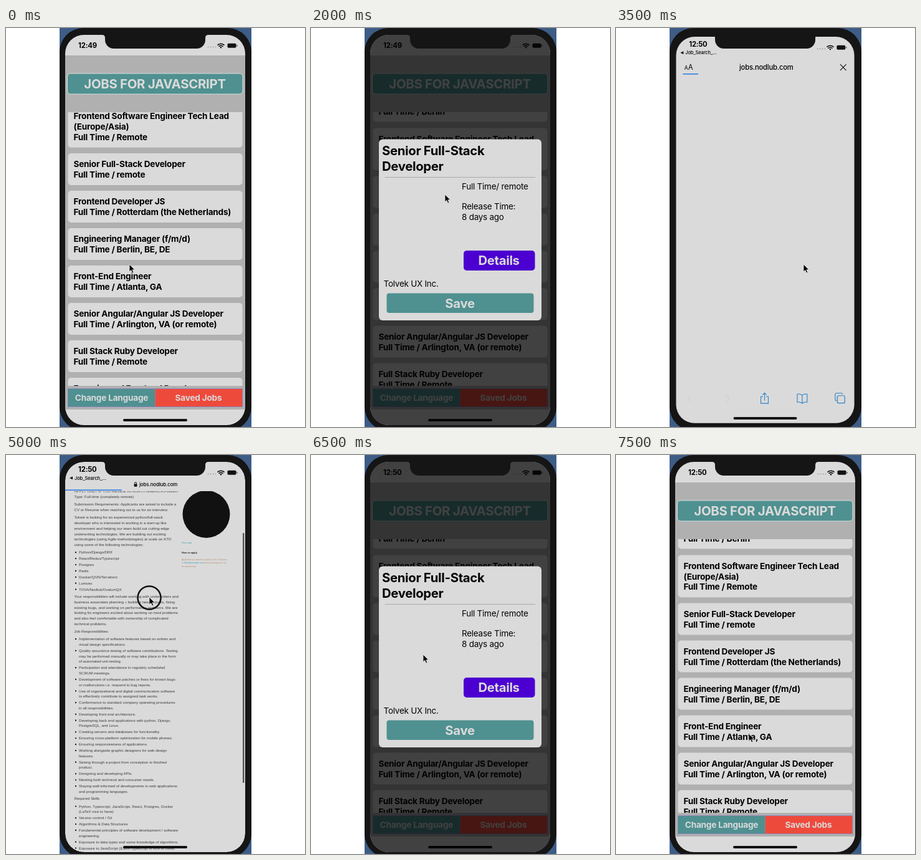
Write an HTML page that moves like this. It is 480 px wide and 640 px high and loops after 8000 ms.

```html
<!DOCTYPE html>
<html lang="en">
<head>
<meta charset="utf-8">
<title>Job search app</title>
<style>
  html, body { margin: 0; width: 100%; height: 100%; overflow: hidden; background: #fff; }
  svg { display: block; width: 480px; height: 640px; }
  text { font-family: Inter, sans-serif; letter-spacing: -.015em; white-space: pre; }
  .b { font-weight: 700; }
  .web { font-family: "Liberation Sans", Arial, sans-serif; letter-spacing: 0; }
</style>
</head>
<body>
<svg id="stage" viewBox="0 0 480 640"></svg>
<script>
const PAPER = '#dadada', TEAL = '#4f9090', BLUE = '#2f80c4', INK = '#111';
const SITE = 'jobs.nodlub.com';

const text = (x, y, s, size = 13.6, more = '') => `<text x="${x}" y="${y}" font-size="${size}" ${more}>${s}</text>`;
const bold = (x, y, s, size = 13.6) => text(x, y, s, size, 'class="b"');
const label = (x, y, s, size) => text(x, y, s, size, `class="b" text-anchor="middle" fill="${PAPER}"`);
const web = (x, y, s, size = 6.1, fill = '#3c3c3c', more = '') => text(x, y, s, size, `class="web" fill="${fill}" ${more}`);
const rect = (x, y, w, h, fill, r = 0, more = '') => `<rect x="${x}" y="${y}" width="${w}" height="${h}" rx="${r}" fill="${fill}" ${more}/>`;
const line = (d, color, w = 1) => `<path d="${d}" fill="none" stroke="${color}" stroke-width="${w}" stroke-linecap="round"/>`;
const group = (attrs, s) => `<g ${attrs}>${s}</g>`;

const jobs = [
  ['Frontend Developer', 'Full Time / Berlin'],
  ['Frontend Software Engineer Tech Lead', '(Europe/Asia)', 'Full Time / Remote'],
  ['Senior Full-Stack Developer', 'Full Time / remote'],
  ['Frontend Developer JS', 'Full Time / Rotterdam (the Netherlands)'],
  ['Engineering Manager (f/m/d)', 'Full Time / Berlin, BE, DE'],
  ['Front-End Engineer', 'Full Time / Atlanta, GA'],
  ['Senior Angular/Angular JS Developer', 'Full Time / Arlington, VA (or remote)'],
  ['Full Stack Ruby Developer', 'Full Time / Remote'],
  ['Experienced Frontend Developer', 'Full Time / Remote']
];

// Paragraphs, with lines split by "|"; those starting with "*" are bullets.
const article = [
  'Job Details: Applicant Region: Toronto and North America -|APPLY ONLY IF YOU RESIDE IN NORTH AMERICA Position|Type: Full-time (completely remote)',
  'Submission Requirements: Applicants are asked to include a|CV or Resume when reaching out to us for an interview.',
  'Tolvek is looking for an experienced python/full-stack|developer who is interested in working in a start-up like|environment and helping our team build out cutting-edge|underwriting technologies. We are building out exciting|technologies (using Agile methodologies) at scale on KTO|using some of the following technologies:',
  '*Python/Django/DRF', '*React/Redux/Typescript', '*Postgres', '*Redis', '*Docker/QVN/Terraform', '*Lomvex', '*TOVA/Nodlub/OvalumQX',
  'Your responsibilities will include working with underwriters and|business associates planning + building new features, fixing|existing bugs, and working on performance problems. We are|looking for engineers excited about working on hard problems|and also feel comfortable with ownership of complicated|technical problems.',
  'Job Responsibilities:',
  '*Implementation of software features based on written and|visual design specifications.',
  '*Quality assurance testing of software contributions. Testing|may be performed manually or may take place in the form|of automated unit testing.',
  '*Participation and attendance in regularly scheduled|SCRUM meetings.',
  '*Development of software patches or fixes for known bugs|or malfunctions i.e. respond to bug reports.',
  '*Use of organizational and digital communication software|to effectively contribute to assigned task works.',
  '*Conformance to standard company operating procedures|in all responsibilities.',
  '*Developing front end architecture.',
  '*Developing back end applications with python, Django,|PostgreSQL, and Linux.',
  '*Creating servers and databases for functionality.',
  '*Ensuring cross-platform optimization for mobile phones.',
  '*Ensuring responsiveness of applications.',
  '*Working alongside graphic designers for web design|features.',
  '*Seeing through a project from conception to finished|product.',
  '*Designing and developing APIs.',
  '*Meeting both technical and consumer needs.',
  '*Staying well-informed of developments in web applications|and programming languages.',
  'Required Skills',
  '*Python, Typescript, JavaScript, React, Postgres, Docker|(LaTeX nice to have)',
  '*Version control / Git',
  '*Algorithms &amp; Data Structures',
  '*Fundamental principles of software development / software|engineering.',
  '*Exposure to data types and some knowledge of algorithms.',
  '*Exposure to JavaScript (ES6+/Typescript is nice to have)'
];

function articleText() {
  let y = 152.6, out = '';
  article.forEach((p, i) => {
    const item = p[0] === '*', nextItem = (article[i + 1] || '')[0] === '*';
    if (item) out += `<circle cx="112" cy="${y - 2}" r="1.1"/>`;
    p.replace('*', '').split('|').forEach((s, n) => {
      if (n) y += 8.75;
      out += web(item ? 117 : 109.5, y, s);
    });
    y += !item ? 12.2 : nextItem ? 9.9 : 11.4;
  });
  return out;
}

const page = rect(95, 79, 287, 16, '#2467b4') +
  '<circle cx="107.5" cy="87" r="4.5" fill="#dadada"/>' +
  web(310, 88.6, 'All jobs &#160; · Post a job &#160; · How it works', 4.1, '#dde6f0', 'font-weight="700"') +
  web(103, 106, '‹ See all positions', 4.6, '#2467b4') +
  web(109.5, 124, 'Full Time / remote', 5.6, '#999') +
  web(109.5, 132.2, 'Senior Full-Stack Developer', 6.15, '#222', 'font-weight="700"') +
  articleText() +
  web(282, 150.5, 'Tolvek UX Inc.', 3.8, '#222', 'font-weight="700"') +
  '<circle cx="321.5" cy="196" r="38" fill="#111"/>' +
  web(282, 242.5, 'View map', 3.7, '#35a5a0') +
  web(282, 258.5, 'How to apply', 4, '#222', 'font-weight="700"') +
  web(282, 269.5, 'Applicants are asked to include a CV or Resume', 3.4, '#b98a68') +
  web(282, 275.3, 'to <tspan fill="#3a9db5">hello@example.com</tspan> when reaching out to us', 3.4, '#b98a68') +
  web(282, 281, 'for an interview', 3.4, '#b98a68');

const statusIcons = [324, 328, 332, 336].map(x => `<circle cx="${x + .5}" cy="30.5" r=".8" fill="#888"/>`).join('') +
  line('M340 27.2a7.5 7.5 0 0 1 10 0M342 29.4a4.6 4.6 0 0 1 6 0', INK, 1.6) +
  '<circle cx="345" cy="31.2" r="1.2"/>' +
  rect(355.5, 24.8, 14, 7, INK, 1.8) + rect(370.3, 27, 1.3, 2.8, '#555', .6);
const homeBar = rect(188, 627, 103, 4, INK, 2);

function card(lines, i, scroll) {
  const y = scroll + (i < 2 ? [63, 124][i] : 81 + 60 * i);
  return rect(99.5, y, 280, 17.3 + 16.8 * lines.length, PAPER, 5) +
    lines.map((s, n) => bold(108.5, y + 22.2 + 16.8 * n, s)).join('');
}

// Rule, job type and release time, shared by the filled and the cleared dialog.
const dialogBody = (y, type, age, releaseY) => line(`M119 ${y}H360`, '#aaa') +
  text(242, y + 19, type, 13.4) + text(242, releaseY, 'Release Time:', 13.4) + text(242, releaseY + 16.7, age, 13.4);

function dialog(cleared) {
  const y = cleared ? 303 : 357, save = y + 68.5;
  return (cleared ? rect(109, 172, 261, 243, PAPER, 6) + dialogBody(192, '/', 'Invalid date', 241)
    : rect(109, 178.5, 261, 290.5, PAPER, 6) +
      bold(114, 203.8, 'Senior Full-Stack', 20.3) + bold(114, 228.5, 'Developer', 20.3) +
      dialogBody(239.5, 'Full Time/ remote', '8 days ago', 291) + text(116.5, 415, 'Tolvek UX Inc.', 13.4)) +
    rect(245, y, 114.5, 32, '#4b00d1', 5) + label(301.5, y + 23.3, 'Details', 20.3) +
    rect(121.5, save, 236, 31.5, TEAL, 4) + label(239, save + 23, 'Save', 20.3);
}

function app(scroll, clock = '12:49', dim = 0, modal = '') {
  return rect(86, 0, 308, 640, PAPER) + rect(86, 44, 308, 568, '#b0b0b0') +
    bold(116, 32, clock, 11.3) + statusIcons +
    rect(98.5, 73, 281.5, 33, TEAL, 5, 'stroke="#d5dede"') + label(239, 97.4, 'JOBS FOR JAVASCRIPT', 20.4) +
    group('clip-path="url(#list)"', jobs.map((j, i) => card(j, i, scroll)).join('')) +
    rect(99.5, 579, 140, 28.5, TEAL) + rect(239.5, 579, 140, 28.5, '#ee4a3c') +
    rect(99.5, 578.5, 280, 29, 'none', 0, 'stroke="#8078c4" stroke-width=".7"') +
    label(169.5, 598.3, 'Change Language') + label(309, 598.3, 'Saved Jobs') + homeBar +
    rect(86, 0, 308, 640, '#000', 0, `opacity="${dim}"`) + modal;
}

const lock = (x, y, k) => group(`transform="translate(${x} ${y}) scale(${k})"`,
  rect(-3.3, -1, 6.6, 5.6, INK, 1) + line('M-2-1v-2a2 2 0 0 1 4 0v2', INK, 1.2));

const toolbar = line('M118 592l-4 5 4 5M177 592l4 5-4 5', '#cbcbcb') +
  line('M235.5 594h-3v11h12v-11h-3M238.5 600v-12m-3 3l3-3 3 3' +
    'M299.5 592q-3-3-8-2v13q5-1 8 2q3-3 8-2v-13q-5-1-8 2v13' +
    'M365 590q0-1.500-2-1.500h-8q-2 0-2 2v8q0 2 2 2', BLUE, 1.1) +
  rect(356.5, 592.5, 12, 12, 'none', 2, `stroke="${BLUE}" stroke-width="1.2"`);

function browser({ scale = 1, loaded = true, scroll = 0, progress = 0 }) {
  const compact = scroll > 0;
  const head = compact
    ? lock(208, 47.3, .75) + text(214, 50, SITE, 7.9, 'font-weight="500"')
    : text(108.5, 64, 'A', 8.5) + text(114.5, 64, 'A', 11.5) +
      (loaded ? lock(195.5, 60.5, 1) : '') + text(loaded ? 204 : 197.5, 64.2, SITE, 11.3, 'font-weight="500"') +
      line(loaded ? 'M369.5 57.5a5 5 0 1 0 .8 3M366 57.8h3.8v-3.8' : 'M361.5 56l9 9m0-9l-9 9', INK, 1.2);
  const [barY, barH] = compact ? [125, 401] : [82, 336];
  const body = loaded
    ? group(`clip-path="url(#${compact ? 'tall' : 'page'})"`, group(`transform="translate(0 ${-scroll})"`, page)) +
      rect(380, barY, 2.4, barH, '#555', 1.2)
    : '';
  return group(`transform="translate(240 320) scale(${scale}) translate(-240 -320)"`,
    rect(95, 11, 289, 626, PAPER, 30) + body +
    bold(116, 27, '12:50', 11.3) + statusIcons +
    '<path d="M107 34.5l-5 2.4 5 2.4z"/>' +
    text(110, 39.5, 'Job_Search_...', 7.5, 'font-weight="500"') + head +
    (progress ? rect(compact ? 95 : 106, compact ? 55.5 : 70.5, progress, 1.6, '#2f7de0') : '') +
    (compact ? '' : toolbar) + homeBar);
}

const down = 36.5;
// One entry per half second: cursor x, cursor y, screen, pressed.
const steps = [
  [198, 379, app(0)],
  [202, 360, app(14)],
  [210, 300, app(30)],
  [215, 267, app(down)],
  [215, 267, app(down, '12:49', .7, dialog(false))],
  [272, 338, app(down, '12:49', .7, dialog(false))],
  [301, 379, app(down, '12:50', .7, dialog(false))],
  [301, 379, browser({ scale: .99, loaded: false, progress: 25 })],
  [301, 379, browser({ loaded: false, progress: 40 })],
  [265, 310, browser({ progress: 70 })],
  [230, 228, browser({ scroll: 101, progress: 91 }), true],
  [180, 140, browser({})],
  [110, 37, browser({})],
  [180, 320, app(down, '12:50', .7, dialog(false))],
  [216, 489, app(down, '12:50', .46, group('opacity=".6"', dialog(true)))],
  [213, 447, app(down, '12:50')]
];

const clip = (id, y, h, r = 0) => `<clipPath id="${id}">${rect(95, y, 289, h, '#000', r)}</clipPath>`;
const defs = `<defs>${clip('list', 135, 439)}${clip('page', 79, 501)}${clip('tall', 58, 582)}${clip('screen', 11, 626, 30)}</defs>`;
const notch = '<path fill="#151515" d="M154 10v1q5 0 5 5v3a14 14 0 0 0 14 14h133a14 14 0 0 0 14-14v-3q0-5 5-5v-1z"/>';
const arrow = '<path stroke="#eee" stroke-width=".8" d="M0 0v12l2.8-2.5 1.9 4.5 2.1-.9-1.9-4.3h3.8z"/>';

function draw([x, y, screen, pressed]) {
  return defs + rect(86, 0, 308, 640, '#3d5c86') + rect(86, 0, 308, 646, '#151515', 38) +
    group('clip-path="url(#screen)"', screen) + notch +
    group(`transform="translate(${x} ${y})"`, arrow +
      (pressed ? '<circle cy="1" r="18.5" fill="none" stroke="#111" stroke-width="2.5"/>' : ''));
}

const stage = document.getElementById('stage');
let shown = -1;
function tick() {
  const now = Math.floor(performance.now() % 8000 / 500);
  if (now !== shown) stage.innerHTML = draw(steps[shown = now]);
  requestAnimationFrame(tick);
}
tick();
</script>
</body>
</html>
```
